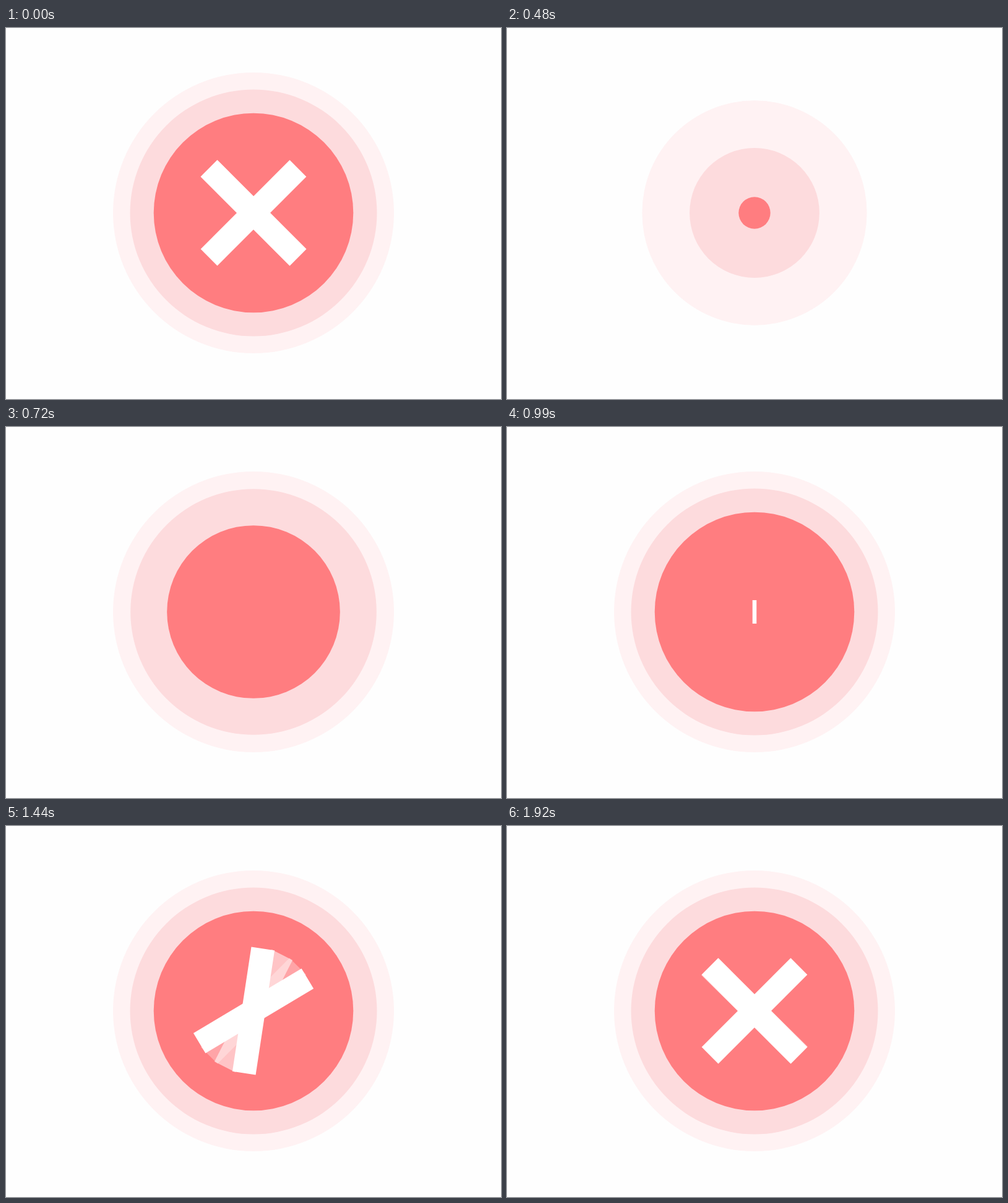
An HTML page with a canvas that plays this animation: 800x600 px, repeating every 2.25 s.

```html
<!DOCTYPE html>
<html>
<head>
<meta charset="utf-8">
<style>
  html, body { margin: 0; width: 100%; height: 100%; overflow: hidden; background: #fefefe; }
  canvas { display: block; }
</style>
</head>
<body>
<canvas id="stage" width="800" height="600"></canvas>
<script>
const ctx = document.getElementById('stage').getContext('2d');
const LOOP = 2250, STEP = 30, HOLD = 120;
const BAR = { length: 203.5, thickness: 38 };
const DISCS = [
  { radius: 227, start: 120, color: '#fff2f3' },
  { radius: 199.5, start: 210, color: '#fddbdd' },
  { radius: 161.3, start: 330, color: '#ff7d80' },
];

const progress = (t, start, end) => Math.min(1, Math.max(0, (t - start) / (end - start)));
const smooth = u => u * u * (3 - 2 * u);

// Cubic bezier (x1, 0, x2, 1), solved by bisection.
function bezier(x, x1, x2) {
  let low = 0, high = 1;
  for (let i = 0; i < 24; i++) {
    const u = (low + high) / 2, v = 1 - u;
    if (3 * x1 * u * v * v + 3 * x2 * u * u * v + u * u * u < x) low = u;
    else high = u;
  }
  return smooth((low + high) / 2);
}

function disc(t, { radius, start, color }) {
  const scale = t <= start ? 0 : bezier(progress(t, start, start + 535), 0.445, 0.53);
  ctx.fillStyle = color;
  ctx.beginPath();
  ctx.arc(0, 0, radius * scale, 0, 2 * Math.PI);
  ctx.fill();
}

// Swings ten degrees past the rest angle, then settles.
function angle(t, rest) {
  const swing = smooth(progress(t, 1248, 1603));
  const settle = smooth(progress(t, 1603, 1905));
  return (rest + 10) * swing - 10 * settle;
}

function bar(t, degrees, alpha = 1) {
  const length = BAR.length * smooth(progress(t, 960, 1245));
  ctx.save();
  ctx.globalAlpha = alpha;
  ctx.fillStyle = '#fff';
  ctx.rotate(-degrees * Math.PI / 180);
  ctx.fillRect(-length / 2, -BAR.thickness / 2, length, BAR.thickness);
  ctx.restore();
}

function draw(time) {
  let t = Math.floor(time % LOOP / STEP) * STEP;
  if (t < HOLD) t = LOOP;
  ctx.setTransform(1, 0, 0, 1, 0, 0);
  ctx.fillStyle = '#fefefe';
  ctx.fillRect(0, 0, 800, 600);
  ctx.translate(400, 299);
  DISCS.forEach(d => disc(t, d));
  // The faster bar leaves two fading echoes.
  bar(t - 2 * STEP, angle(t - 2 * STEP, 135), 0.3);
  bar(t - STEP, angle(t - STEP, 135), 0.55);
  bar(t, angle(t, 135));
  bar(t, angle(t, 45));
}

const began = performance.now();
function tick() {
  draw(performance.now() - began);
  requestAnimationFrame(tick);
}
tick();
</script>
</body>
</html>
```
